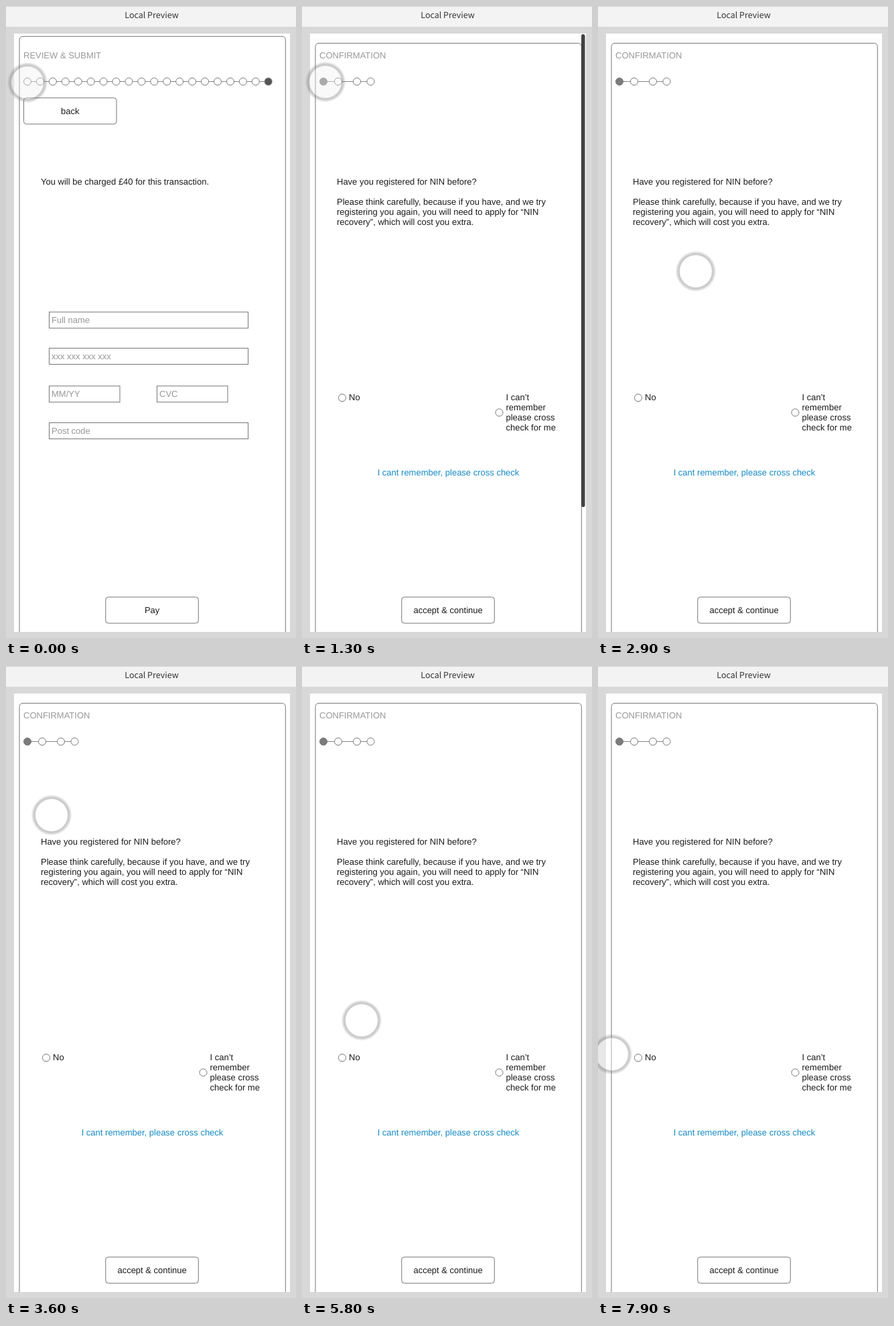
An HTML page that plays this animation: 433 px wide and 941 px high, repeating every 8000 ms.

```html
<!DOCTYPE html>
<html lang="en">
<head>
<meta charset="utf-8">
<title>Local Preview</title>
<style>
  html, body { margin: 0; width: 100%; height: 100%; overflow: hidden; background: #d8d8d8; }
  svg { display: block; width: 100vw; height: 100vh; }
  text {
    font: 13px "Liberation Sans", Arial, sans-serif; fill: #1c1c1c;
    white-space: pre; text-rendering: geometricPrecision;
  }
  .bar { font: 12.5px "Noto Sans CJK JP", "Noto Sans CJK SC", "Noto Sans", sans-serif; fill: #333; }
  .mid { text-anchor: middle; }
  .dim { fill: #989898; }
  .link { fill: #168ac4; }
  .line { fill: #fff; stroke: #777; stroke-width: 1; }
</style>
</head>
<body>
<svg viewBox="0 0 433 941" preserveAspectRatio="none">
  <defs>
    <clipPath id="screen"><rect x="12" y="41" width="412" height="891"/></clipPath>
    <radialGradient id="halo">
      <stop offset=".76" stop-color="#777" stop-opacity="0"/>
      <stop offset=".82" stop-color="#777" stop-opacity=".42"/>
      <stop offset=".89" stop-color="#777" stop-opacity=".32"/>
      <stop offset="1" stop-color="#888" stop-opacity="0"/>
    </radialGradient>
  </defs>
  <rect width="433" height="941" fill="#d8d8d8"/>
  <rect width="433" height="31" fill="#f3f3f3"/>
  <path d="M0 .5H433" stroke="#d0d0d0"/>
  <text class="bar mid" x="217.5" y="18">Local Preview</text>
  <g clip-path="url(#screen)">
    <rect x="12" y="41" width="412" height="891" fill="#fefefe"/>
    <g id="pay"></g>
    <g id="confirm"></g>
    <rect id="scroll" x="417" y="42" width="5.5" height="704" rx="2.7" fill="#414141"/>
  </g>
  <g id="touch">
    <circle id="disc" r="25" fill="#fff"/>
    <circle r="30.5" fill="url(#halo)"/>
  </g>
</svg>
<script>
const LOOP = 8000, STEP = 100;
const el = id => document.getElementById(id);
const clamp = v => Math.max(0, Math.min(1, v));
const ramp = (t, a, b) => clamp((t - a) / (b - a));

const text = (x, y, s, cls = '') =>
  `<text x="${x}" y="${y}" class="${cls}">${s.replace(/&/g, '&amp;')}</text>`;
const lines = (x, y, rows) => rows.map((s, i) => text(x, y + i * 15, s)).join('');
const box = (x, y, w, h, r = 0) =>
  `<rect class="line" x="${x}" y="${y}" width="${w}" height="${h}" rx="${r}"/>`;
const ring = (x, y, fill = '#fff') =>
  `<circle class="line" cx="${x}" cy="${y}" r="5.5" style="fill:${fill}"/>`;
const button = (x, y, s) => box(x, y, 138.5, 39, 4) + text(x + 69.3, y + 24, s, 'mid');
const field = (x, y, w, s) => box(x, y, w, 24) + text(x + 3.5, y + 16.3, s, 'dim');
const frame = y => box(20, y, 397.3, 960, 5);
const steps = (xs, on, fill) =>
  `<path d="M${xs[0]} 112.5H${xs[xs.length - 1]}" stroke="#888"/>` +
  xs.map((x, i) => ring(x, 112.5, i === on ? fill : '#fff')).join('');

el('pay').innerHTML = frame(45.3) +
  text(26, 78, 'REVIEW & SUBMIT', 'dim') +
  steps(Array.from({ length: 20 }, (_, i) => 32 + i * 18.93), 19, '#555') +
  button(26.5, 136.8, 'back') +
  text(52, 266, 'You will be charged £40 for this transaction.') +
  field(64.5, 455.7, 297, 'Full name') +
  field(64.5, 509.5, 297, 'xxx xxx xxx xxx') +
  field(64.5, 565.8, 105.5, 'MM/YY') +
  field(225.5, 565.8, 105.5, 'CVC') +
  field(64.5, 620.5, 297, 'Post code') +
  button(148.8, 880, 'Pay');

el('confirm').innerHTML = frame(55.4) +
  text(26, 78, 'CONFIRMATION', 'dim') +
  steps([32, 54, 82, 102.5], 0, '#7c7c7c') +
  text(52, 266, 'Have you registered for NIN before?') +
  lines(52, 296, [
    'Please think carefully, because if you have, and we try',
    'registering you again, you will need to apply for “NIN',
    'recovery”, which will cost you extra.'
  ]) +
  ring(60, 583.3) + text(70, 587, 'No') +
  ring(294.5, 605.3) +
  lines(304.5, 587, ['I can’t', 'remember', 'please cross', 'check for me']) +
  text(218.5, 699, 'I cant remember, please cross check', 'link mid') +
  button(148.8, 880, 'accept & continue');

// Pointer path: time, x, y
const path = [
  [0, 32, 114], [300, 33, 113], [1300, 35, 113], [1600, 35, 113],
  [2000, 149, 403], [2100, 153, 411], [2500, 153, 411], [2900, 146, 395],
  [3200, 107, 318], [3300, 98, 295], [3600, 68, 222], [3900, 63, 194],
  [4600, 64, 193], [4900, 66, 197], [5000, 66, 197], [5100, 68, 203],
  [5500, 107, 446], [5600, 107, 446], [6100, 62, 650], [7100, 62, 650],
  [7900, 21, 578], [8000, 21, 578]
];

function pointer(t) {
  const i = Math.max(1, path.findIndex(p => p[0] > t));
  const a = path[i - 1], b = path[i], k = ramp(t, a[0], b[0]);
  return [a[1] + (b[1] - a[1]) * k, a[2] + (b[2] - a[2]) * k];
}

function draw(t) {
  const mix = ramp(t, 600, 1000);
  el('pay').style.opacity = mix < 1 ? 1 : 0;
  el('confirm').style.opacity = mix;
  el('scroll').style.opacity = ramp(t, 600, 900) * (1 - ramp(t, 1500, 2100));
  el('touch').setAttribute('transform', `translate(${pointer(t)})`);
  // The disc is tinted while it rests on the step dots
  const tint = 1 - ramp(t, 1500, 2000);
  el('disc').setAttribute('fill', tint > .5 ? '#f0f0f0' : '#fff');
  el('disc').style.opacity = .4;
}

const start = performance.now();
function tick() {
  const t = (performance.now() - start) % LOOP;
  draw(Math.floor(t / STEP) * STEP);
  requestAnimationFrame(tick);
}
tick();
</script>
</body>
</html>
```
